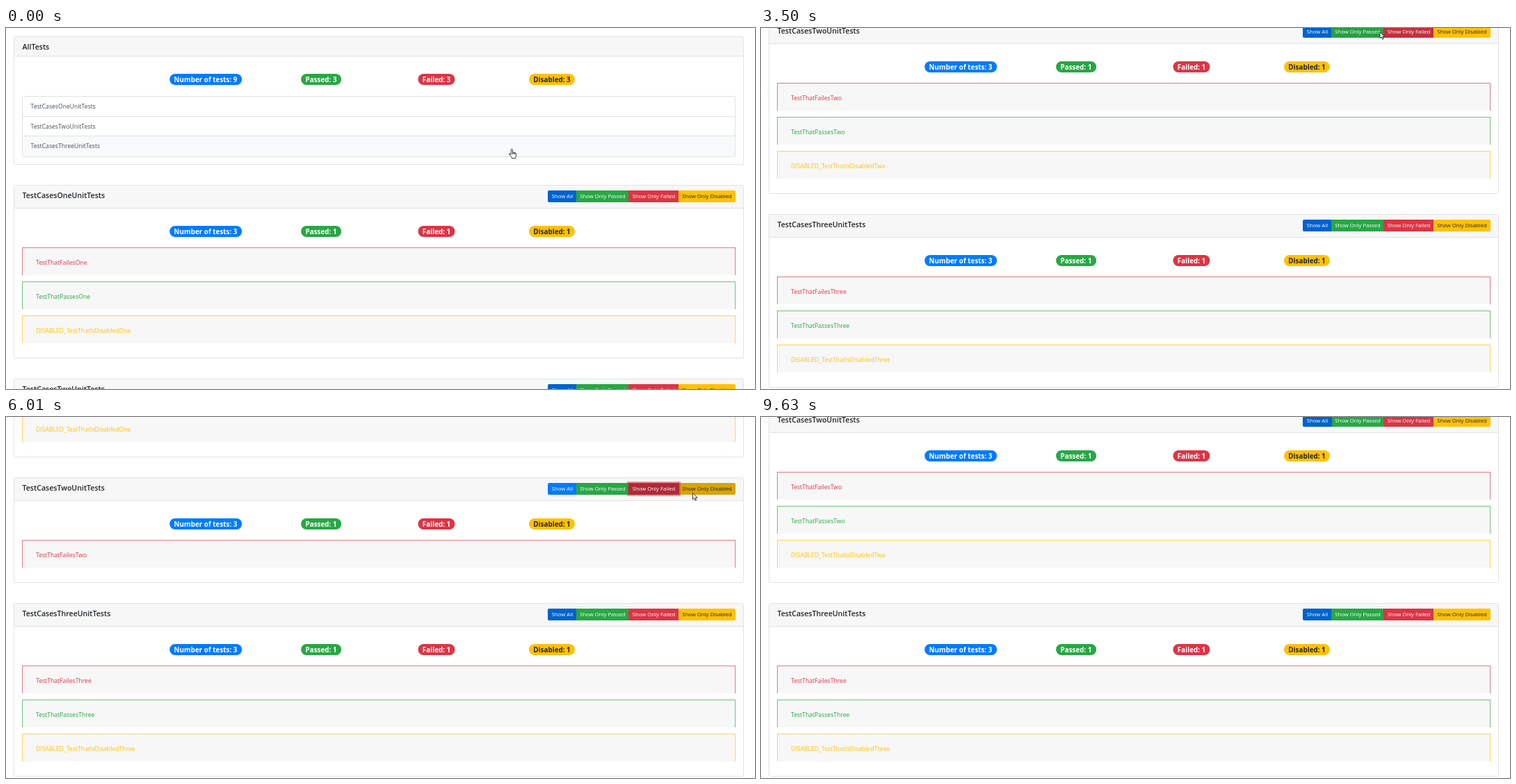
Animation of 1077x520 px, one loop 9.7 s. Source, as an HTML page:

```html
<!DOCTYPE html>
<html lang="en">
<head>
<meta charset="utf-8">
<title>Test report</title>
<style>
  * { box-sizing: border-box; }
  html, body { margin: 0; width: 100%; height: 100%; overflow: hidden; background: #fff; }
  body { position: relative; font: 8.65px "Open Sans", "Noto Sans", sans-serif; color: #212529; white-space: nowrap; }
  #page { position: absolute; left: 11px; top: 12px; width: 1050px; }
  .card { position: relative; height: 185px; border: 1px solid #e2e2e2; border-radius: 2.4px; margin-bottom: 29px; padding: 85px 11px 0; }
  .head { position: absolute; left: 0; right: 0; top: 0; height: 28px; padding-left: 11.5px; background: #f7f7f7;
    border-bottom: 1px solid #e2e2e2; font-size: 10.6px; font-weight: 600; line-height: 29px; }
  .badge { position: absolute; top: 53px; height: 16px; padding: 0 6.3px; border-radius: 8px; transform: translateX(-50%);
    font-size: 9.87px; font-weight: 700; line-height: 16px; color: #fff; }
  .suite { height: auto; padding: 89px 11px 12px; }
  .suite .head { height: 33px; }
  .suite .badge { top: 58px; }
  .list { border: 1px solid #e2e2e2; border-radius: 2.4px; }
  .row { height: 29px; line-height: 28px; padding-left: 11.5px; border-bottom: 1px solid #e2e2e2; color: #495057; }
  .row:nth-child(2) { height: 28px; }
  .row:last-child { border: 0; }
  .item { height: 40px; margin-bottom: 9px; padding-left: 19px; line-height: 43px; background: #f7f7f7;
    border: 1px solid; border-bottom: 0; }
  .btn { position: absolute; top: 7px; height: 17px; line-height: 17px; text-align: center; color: #fff;
    font-size: 7.75px; font-weight: 400; }
  .btn:first-child { border-radius: 2px 0 0 2px; }
  .btn:last-child { border-radius: 0 2px 2px 0; }
  .dark { color: #212529; }
  svg { position: absolute; left: 0; top: 0; overflow: visible; }
</style>
</head>
<body>
<div id="page"></div>
<svg id="cursor" width="12" height="15" stroke="#222" stroke-width=".9" stroke-linejoin="round">
  <circle id="glow" r="7.5" fill="#fff200" fill-opacity=".65" stroke="none"/>
  <path id="hand" transform="translate(-4 -1)" fill="#fff" d="M3.2 8.4V1.5a1.1 1.1 0 0 1 2.2 0V5.2L7 5.4l2 .4q1.5.4 1.5 1.6v2.2q0 1.5-.8 2.4v1.7H4.2v-1.4Q3 11 .8 8.2q-.7-1.1.3-1.4 .8-.2 2.1 1.6zM5.4 5.2V8M7.2 5.5V8M9 5.9V8"/>
  <path id="arrow" fill="#fff" d="M.5.5v9.3l2.1-2 1.5 3.4 1.5-.7L4.2 7.3h2.9z"/>
</svg>
<script>
const LOOP = 9700, JUMP = 1800, FADE = 150, HOVER = .75;
const ALL = 0, PASSED = 1, FAILED = 2, DISABLED = 3;
const $ = id => document.getElementById(id);
const rgba = (c, a = 1) => `rgba(${c.map(Math.round)},${a})`;
const mix = (a, b, k) => a + (b - a) * k;
const show = (el, on) => el.style.display = on ? '' : 'none';

const kinds = [
  { badge: 'Number of tests', button: 'Show All', left: 779, right: 821, color: [0, 123, 255] },
  { badge: 'Passed', button: 'Show Only Passed', left: 820, right: 896, color: [40, 167, 69] },
  { badge: 'Failed', button: 'Show Only Failed', left: 895, right: 968, color: [220, 53, 69] },
  { badge: 'Disabled', button: 'Show Only Disabled', left: 967, right: 1049, color: [255, 193, 7] }
];
const names = ['One', 'Two', 'Three'];
const itemKinds = [FAILED, PASSED, DISABLED];
const itemNames = ['TestThatFailes', 'TestThatPasses', 'DISABLED_TestThatIsDisabled'];
const ink = i => i == DISABLED ? 'dark' : '';
const shaded = (color, k) => rgba(color.map(v => v * (1 - .2 * k)));

const badges = each => kinds.map((k, i) =>
  `<div class="badge ${ink(i)}" style="left:${275 + 166 * i}px;background:${rgba(k.color)}">${k.badge}: ${i ? each : 3 * each}</div>`).join('');

const buttons = kinds.map((k, i) =>
  `<span class="btn ${ink(i)}" style="left:${k.left - 12}px;width:${k.right - k.left}px;background:${shaded(k.color, i == ALL)}">${k.button}</span>`).join('');

const item = (name, i) => {
  const { color } = kinds[itemKinds[i]];
  return `<div class="item" style="color:${rgba(color)};border-color:${rgba(color, .65)}">${itemNames[i]}${name}</div>`;
};

const suite = name => `<div class="card suite" id="${name}"><div class="head">TestCases${name}UnitTests<div>${buttons}</div></div>` +
  badges(1) + itemNames.map((_, i) => item(name, i)).join('') + '</div>';

$('page').innerHTML = `<div class="card"><div class="head">AllTests</div>${badges(3)}<div class="list">` +
  names.map(n => `<div class="row">TestCases${n}UnitTests</div>`).join('') + '</div></div>' + names.map(suite).join('');

const rows = document.querySelectorAll('.row');
const liveButtons = $('Two').querySelectorAll('.btn');
const items = $('Two').querySelectorAll('.item');

// Each move eases the pointer from where it rests to x, y
const moves = [
  [0, 0, 727, 175], [50, 990, 542, 151], [1060, 1370, 528, 147], [2360, 3320, 902, 4], [3390, 3600, 879, 6],
  [4360, 4960, 924, 100], [5500, 6010, 987, 109], [6600, 7300, 797, 101], [8030, 9050, 982, 525]
].map(([from, to, x, y]) => ({ from, to, x, y }));

const clicks = [
  { down: 3890, up: 4000, kind: PASSED }, { down: 5340, up: 5470, kind: FAILED },
  { down: 6370, up: 6500, kind: DISABLED }, { down: 7360, up: 7600, kind: ALL }
];

const chosenAt = t => clicks.findLast(c => c.up <= t)?.kind ?? ALL;
const pressedAt = t => clicks.find(c => c.down <= t && t < c.up);
const scrollAt = t => t < JUMP ? 0 : chosenAt(t) == ALL ? 516 : 418;

function pointerAt(t) {
  const i = moves.findLastIndex(m => m.from <= t), b = moves[i], a = moves[i - 1] || b;
  let k = Math.min(1, (t - b.from) / (b.to - b.from || 1));
  k *= k * (3 - 2 * k);
  return i ? [mix(a.x, b.x, k), mix(a.y, b.y, k)] : [b.x, b.y];
}

function levelAt(i, t) {
  if (chosenAt(t) == i || pressedAt(t)?.kind == i) return 1;
  const [x, y] = pointerAt(t), top = 513 - scrollAt(t);
  return y >= top && y < top + 17 && x >= kinds[i].left && x < kinds[i].right - 1 ? HOVER : 0;
}

function focusAt(i, t) {
  const kind = clicks.findLast(c => c.down <= t)?.kind;
  return kind == i && (i != ALL || t < 7600 || t > 9600) ? 1 : 0;
}

// A linear transition is the mean of the state over the last FADE ms
function faded(state, i, t) {
  const steps = 15;
  let sum = 0;
  for (let s = 0; s < steps; s++) sum += state(i, Math.max(0, t - s * FADE / steps));
  return sum / steps;
}

function draw(t) {
  const [x, y] = pointerAt(t), onList = t >= 1620 && t < JUMP, isHand = t < 1870;
  $('cursor').style.transform = `translate(${x}px,${y}px)`;
  show($('hand'), isHand);
  show($('arrow'), !isHand);
  show($('glow'), onList || pressedAt(t));

  rows.forEach((row, i) => {
    const hovered = i == (y < 156 ? 1 : 2);
    row.style.background = !hovered ? '#fff' : onList ? '#e9ecef' : '#f8f9fa';
    row.style.color = hovered && onList ? '#212529' : '';
  });

  const chosen = chosenAt(t);
  items.forEach((el, i) => show(el, chosen == ALL || chosen == itemKinds[i]));
  liveButtons.forEach((el, i) => {
    const { color } = kinds[i], ring = faded(focusAt, i, t);
    el.style.background = shaded(color, faded(levelAt, i, t));
    el.style.boxShadow = `0 0 0 ${2 * ring}px ${rgba(color, .5 * ring)}`;
    el.style.zIndex = focusAt(i, t);
  });
  $('page').style.transform = `translateY(${-scrollAt(t)}px)`;
}

const start = performance.now();
function tick() {
  draw((performance.now() - start) % LOOP);
  requestAnimationFrame(tick);
}
tick();
</script>
</body>
</html>
```
